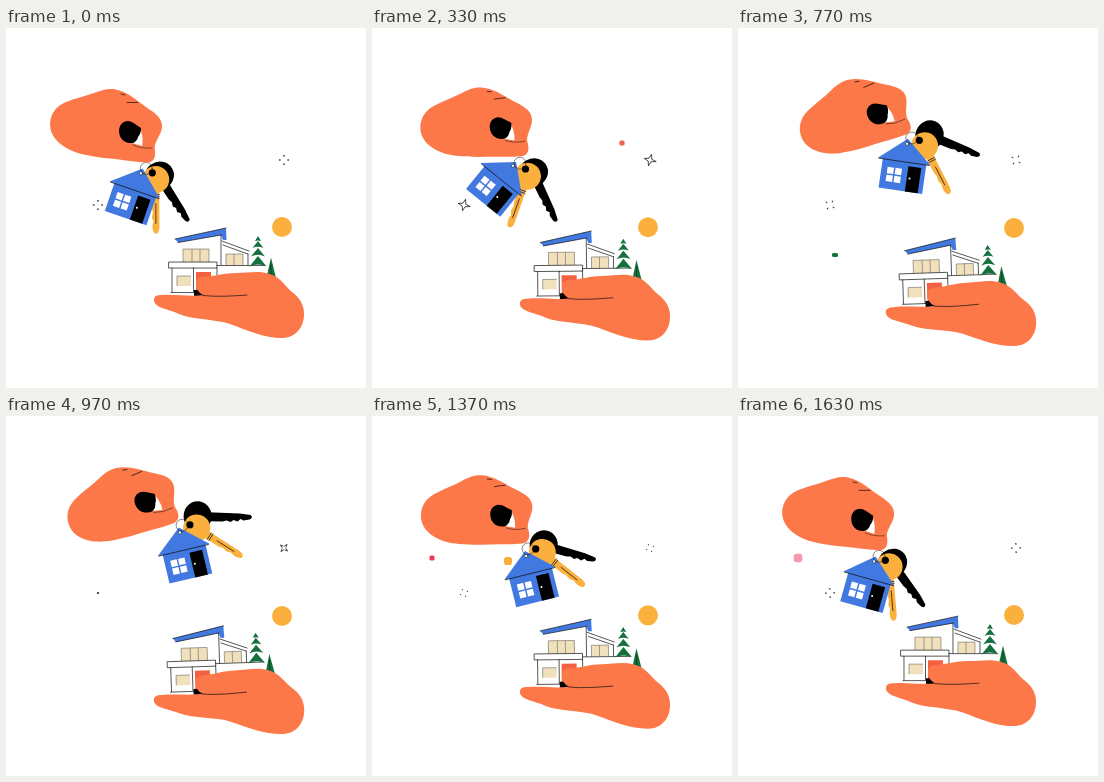
An HTML page for the animation above (1.66 s loop, 360 by 360 pixels).

```html
<!DOCTYPE html>
<html lang="en">
<head>
<meta charset="utf-8">
<title>House keys</title>
<style>
  html, body { margin: 0; width: 100%; height: 100%; overflow: hidden; background: #fff; }
  svg { display: block; width: 100vw; height: 100vh; }
  .skin { fill: #fd7849; }
  .blue { fill: #4279e0; }
  .gold { fill: #fbb03e; }
  .green { fill: #14703c; }
  .sand { fill: #f0e0bc; }
  .white { fill: #fff; }
  .line { fill: none; stroke: #111; stroke-width: .7; stroke-linecap: round; stroke-linejoin: round; }
  .soft { fill: none; stroke: #6d675c; stroke-width: .6; }
  .fine { stroke-width: .5; }
</style>
</head>
<body>
<svg viewBox="0 0 360 360">
  <circle id="sun" class="gold" cx="276" cy="199" r="10"/>
  <g id="dots"></g>
  <g id="stars"></g>

  <g id="home">
    <path class="white" d="M173 214L216 205V213L243 223V238H259V262H166V240H163V234H173Z"/>
    <path class="blue" d="M169 211L220 200L220.500 212H217L215 207L172 214.500Z"/>
    <path class="line" d="M169 211L220 200M172 214.500L215 207M215 207V237M216 213L243 223M217 217L242 226"/>
    <path class="sand" d="M177 221H203V234H177ZM220 226H237V237H220Z"/>
    <path class="soft" d="M177 234V221H203V234M186 221V234M194 221V234M220 237V226H237V237M228 226V237"/>
    <path class="white" d="M163 234H211V240H163Z"/>
    <path class="line" d="M163 234H211V240H163ZM166 240V264M187.500 240V264M211 240V250M211 237.500H259M242 226V237"/>
    <path class="sand" d="M171 248H185V258H171Z"/>
    <path class="soft" d="M171 258V248H185"/>
    <path fill="#f55f42" d="M190 244H205V263H190Z"/>
    <path d="M188 262H208V268H188Z"/>
    <path class="line" d="M165 264.500H190"/>
    <path class="green" d="M252 208L255 213Q252 212 249 213ZM252 213L257.500 220Q252 217.500 246.500 220ZM252 220L259 228.500Q252 225 245 228.500ZM252 228L260.500 238.500Q252 234.500 243.500 238.500ZM265 229.500L271 254H259.500Z"/>
    <path class="line fine" d="M265 236V252"/>
    <path class="skin" d="M148 272C148 268 151 267 156 267C171 266 184 269 198 267C193 266 190 261 190 255C190 250 194 249 200 248.500C211 248 218 245 230 245C243 245 253 242 265 246.500C275 250 279 258 286 264C294 270 298 277 298 286C298 300 289 310 276 310C258 310 243 303 224 296C209 291 188 292 173 286C163 281 148 280 148 272Z"/>
    <path class="line" d="M197 267.500C211 269 227 268 241 267"/>
  </g>

  <g id="darkKey">
    <ellipse rx="14" ry="15"/>
    <path d="M10 -4L42 -3L53 -1.500Q56 1 52 3L46 4L43 2.500L40 5L36 3.500L33 5.500L29 4L25 5L10 5Z"/>
  </g>
  <g id="goldKey">
    <path class="gold" d="M10 -3.500H48Q55 -3 54 1Q53 3.500 46 3.500L42 2.500L38 4L33 3L28 4H10Z"/>
    <circle class="gold" r="13.500"/>
    <path class="line" d="M17 -3.500V4M15 -3.500V4M24 0H44"/>
  </g>
  <circle id="keyHole" r="3.600"/>

  <g id="charm">
    <path class="blue" d="M-22 20H22V52.500H-22Z"/>
    <path class="blue" d="M0 0L26 23H-27Z"/>
    <path class="line" d="M-26 23.300H25"/>
    <path class="white" d="M-16 30.500h6.500v6.500h-6.500zM-8 30.500h6.500v6.500h-6.500zM-16 38.500h6.500v6.500h-6.500zM-8 38.500h6.500v6.500h-6.500z"/>
    <path d="M4.500 27H17.500V52.500H4.500Z"/>
    <circle class="white" cx="7.300" cy="39" r="1"/>
    <circle class="line fine" cx="0" cy="5" r="1.600" style="fill:#fff"/>
  </g>
  <circle id="ring" class="line fine" r="6"/>

  <g id="hand">
    <path class="skin" d="M44 97C44 86 50 78 60 74C70 70 80 68 88 65C96 62 102 60 110 61.500C122 64 130 72 140 79C147 84 156 89 156 98C156 106 149 112 148.500 120C150 127 149 134.500 141 134.500C127 134 113 131 98 130C84 128 72 126 63 121.500C52 116 44 107 44 97Z"/>
    <path class="white" d="M133 99Q138 107 136 118L126 115Z"/>
    <path d="M113 103C113 97 117 93 122 93C126 93 130 97 135 100Q135 106 132 109Q131 113 127 115C119 116 113 111 113 103Z"/>
    <path class="line" d="M115 66L119 67M121 74.500H132"/>
    <path class="line fine" d="M127 117Q135 121 146 120"/>
  </g>
</svg>
<script>
const LOOP = 1660;
const NS = "http://www.w3.org/2000/svg";
const el = id => document.getElementById(id);

function add(parent, name, attrs) {
  const node = document.createElementNS(NS, name);
  set(node, attrs);
  return parent.appendChild(node);
}
function set(node, attrs) {
  for (const key in attrs) node.setAttribute(key, attrs[key]);
}
function place(node, x, y, angle = 0) {
  node.setAttribute("transform", `translate(${x} ${y}) rotate(${angle})`);
}

const wave = (t, peak) => Math.cos(2 * Math.PI * (t - peak) / LOOP);
// Pendulum angle with a small double-rate sway on top.
const swing = (t, mean, size, peak, sway) =>
  mean + size * wave(t, peak) + sway * wave(2 * t, 1600);
const polar = (x, y, r, deg) => {
  const a = deg * Math.PI / 180;
  return [x + r * Math.cos(a), y + r * Math.sin(a)];
};

// Linear track through [time, value] points.
function track(points, t) {
  const i = points.findIndex(p => p[0] >= t);
  if (i <= 0) return points[i < 0 ? points.length - 1 : 0][1];
  const [t0, v0] = points[i - 1], [t1, v1] = points[i];
  return v0 + (v1 - v0) * (t - t0) / (t1 - t0);
}

const dots = [
  { x: 250, y: 115, color: "#f4604a", from: 230, to: 500, size: 7 },
  { x: 97, y: 227, color: "#14703c", from: 540, to: 850, size: 6, flat: .65 },
  { x: 298, y: 204, color: "#14703c", from: 1000, to: 1260, size: 8 },
  { x: 136, y: 145, color: "#fbae3c", from: 1070, to: 1450, size: 8 },
  { x: 60, y: 142, color: "#ee3a5b", from: 1290, to: 1660, size: 8.5 }
].map(d => ({ ...d, node: add(el("dots"), "rect", {
  x: -.5, y: -.5, width: 1, height: 1, rx: .32, fill: d.color
}) }));

const starSize = [[0, 5], [330, 6], [540, 0], [580, 0], [770, 5], [1130, 4.5], [1370, 4], [1660, 5]];
const starDash = [[0, .6], [240, 2], [400, 2], [560, .3], [770, .5], [1050, 2], [1180, 2], [1370, .3], [1660, .6]];
const starTurn = [[0, 0], [330, 15], [770, 35], [1130, 45], [1660, 90]];
const stars = [[278, 132, 1], [92, 177, .15]].map(([x, y, late]) => ({
  x, y, late,
  node: add(el("stars"), "path", { class: "line", pathLength: 8 })
}));

function starPath(r) {
  const pts = [];
  for (let i = 0; i < 8; i++) pts.push(polar(0, 0, i % 2 ? r * .35 : r, i * 45).join(" "));
  return `M${pts.join("L")}Z`;
}

function draw(t) {
  const p = (1 + wave(t, 860)) / 2;
  const bow = 4 * p * (1 - p);

  set(el("hand"), { transform:
    `translate(${124 + 16.7 * p} ${104 - 19.5 * p + 2 * bow}) rotate(${-24 * p}) translate(-124 -104)` });
  set(el("home"), { transform: `translate(0 ${8.5 * p}) rotate(${-2 * p} 270 280)` });
  set(el("sun"), { cy: 199 + p });

  // Everything on the ring hangs from one point under the thumb.
  const x = 139.5 + 32.5 * p + bow, y = 132 - 31.5 * p + 5 * bow;
  const tilt = swing(t, 9, 31, 340, 1.2);
  place(el("charm"), ...polar(x, y, 9, tilt + 90), tilt);

  const dark = swing(t, 32.5, 36, 250, 3);
  place(el("darkKey"), ...polar(x, y, 21, dark - 7), dark);

  const lean = swing(t, 48, 30, 310, 3);
  const gold = swing(t, 68, 45, 305, 3.5);
  place(el("goldKey"), ...polar(x, y, 22, lean), gold);
  place(el("keyHole"), ...polar(x, y, 14.5, lean));
  place(el("ring"), ...polar(x, y, 8.5, (lean + tilt + 90) / 2));

  for (const d of dots) {
    const k = (t - d.from) / (d.to - d.from);
    const on = k > 0 && k < 1;
    set(d.node, { visibility: on ? "visible" : "hidden" });
    if (!on) continue;
    const s = d.size * Math.min(1, .4 + k * .9);
    set(d.node, {
      transform: `translate(${d.x} ${d.y}) scale(${s} ${s * (d.flat || 1)})`,
      opacity: k > .8 ? Math.max(.5, 1 - (k - .8) * 4) : 1
    });
  }

  for (const s of stars) {
    const fade = t > 950 && t < 1250 ? s.late : 1;
    const r = track(starSize, t) * fade;
    const dash = track(starDash, t);
    set(s.node, {
      d: starPath(r),
      visibility: r > .3 ? "visible" : "hidden",
      "stroke-dasharray": dash >= 2 ? "none" : `${dash} ${2 - dash}`,
      "stroke-dashoffset": dash / 2
    });
    place(s.node, s.x, s.y, track(starTurn, t));
  }
}

const start = performance.now();
function frame() {
  draw((performance.now() - start) % LOOP);
  requestAnimationFrame(frame);
}
draw(0);
requestAnimationFrame(frame);
</script>
</body>
</html>
```
